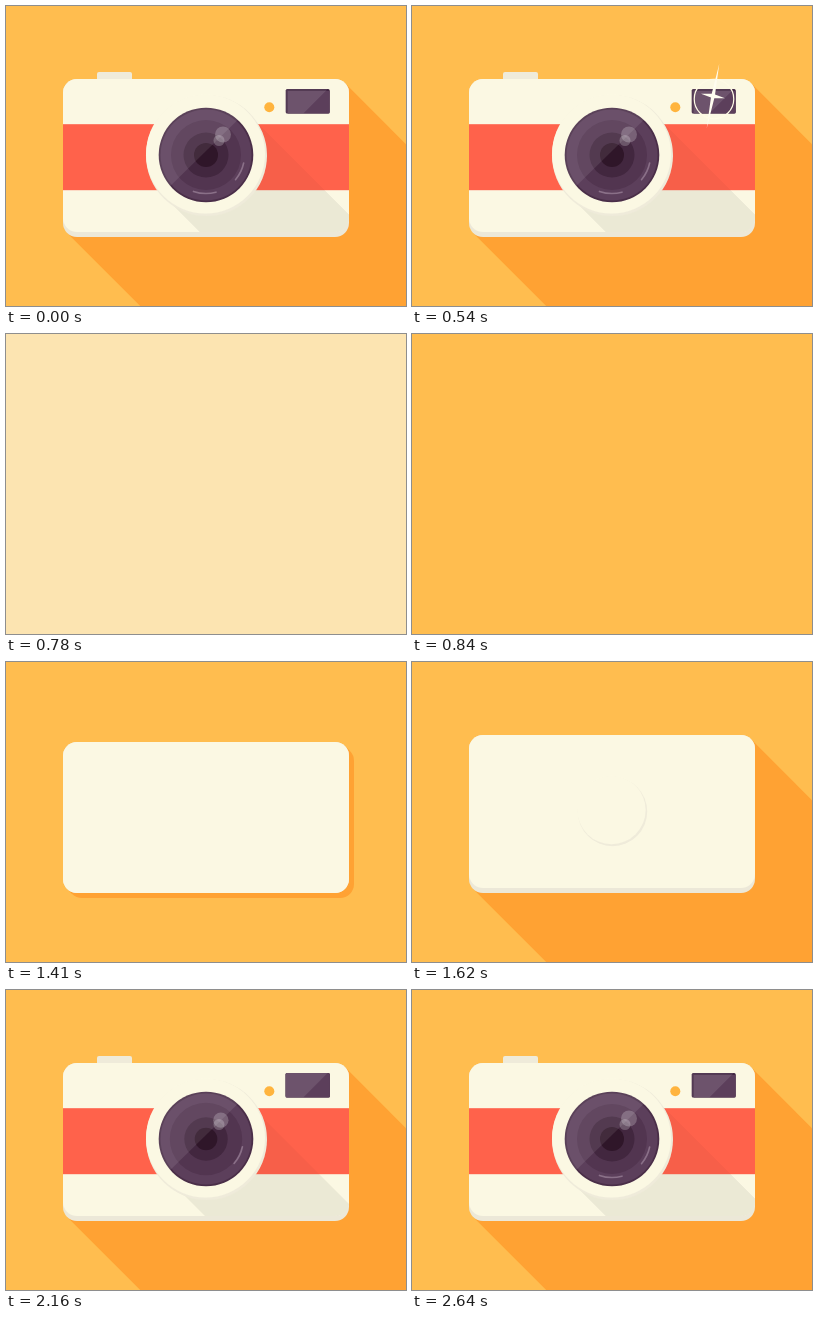
Recreate the animation shown at these times as an HTML page. Size 400x300 px, loop 2.7 s.

```html
<!DOCTYPE html>
<html lang="en">
<head>
<meta charset="utf-8">
<title>Camera</title>
<style>
  html, body { margin: 0; width: 100%; height: 100%; overflow: hidden; background: #ffbd4f; }
  svg { display: block; width: 100%; height: 100%; }
</style>
</head>
<body>
<svg viewBox="0 0 400 300">
  <defs>
    <clipPath id="bodyClip"><rect id="clipRect" x="57" width="286" rx="14"/></clipPath>
    <clipPath id="lensClip"><circle id="lensClipDisc" cx="200" cy="149"/></clipPath>
    <clipPath id="windowClip"><rect id="windowClipRect"/></clipPath>
  </defs>
  <rect width="400" height="300" fill="#ffbd4f"/>
  <g id="camera">
    <g fill="#ffa233">
      <rect id="castEnd" width="286" rx="14"/>
      <polygon id="castSide"/>
    </g>
    <rect id="button" x="91" width="35" height="14" rx="2" fill="#efebda"/>
    <rect id="lip" x="57" width="286" rx="14" fill="#ece8d8"/>
    <rect id="body" x="57" width="286" rx="14" fill="#fbf8e3"/>
    <g clip-path="url(#bodyClip)">
      <g id="shade" opacity=".03">
        <path id="shadePath"/>
      </g>
      <rect id="stripe" x="57" width="286" fill="#ff624b"/>
      <use href="#shade"/>
    </g>
    <circle id="ringLip" cx="200.5" cy="149.5" fill="#efebda"/>
    <circle id="ring" cx="199.5" cy="148" fill="#fbf8e3"/>
    <circle id="rim" cx="200" cy="149" fill="#4a2e48"/>
    <circle id="lens" cx="200" cy="149" fill="#5c3f5b"/>
    <g clip-path="url(#lensClip)">
      <circle id="disc0" cx="200" cy="149" fill="#523550"/>
      <circle id="disc1" cx="200" cy="149" fill="#42273f"/>
      <circle id="disc2" cx="200" cy="149" fill="#2f1629"/>
      <polygon points="150,194 247,99 150,99" fill="#fff" opacity=".09"/>
    </g>
    <g fill="none" stroke="#8a7088" stroke-width="1.6" stroke-linecap="round">
      <path id="arcSide"/>
      <path id="arcLow"/>
    </g>
    <g fill="#fff" fill-opacity=".22">
      <circle id="glint0"/>
      <circle id="glint1"/>
    </g>
    <circle id="dot" cx="263.3" cy="101.3" fill="#ffb43e"/>
    <g clip-path="url(#windowClip)">
      <rect x="270" y="75" width="64" height="40" fill="#3f2440"/>
      <rect id="pane" width="60" height="40" fill="#5c3f5b"/>
      <polygon id="gloss" fill="#fff" opacity=".1"/>
    </g>
  </g>
  <rect id="veil" width="400" height="300" fill="#fbf8e3"/>
  <g id="flash">
    <path id="star" d="M0-67L3.5-4L25 0L3.5 4L0 67L-3.5 4L-25 0L-3.5-4Z" fill="#fffdf0"/>
    <circle id="halo" cx="302" cy="93" fill="none" stroke="#fffbe6"/>
  </g>
</svg>
<script>
const LOOP = 2700, STEP = 30;
const el = {};
document.querySelectorAll('[id]').forEach(n => el[n.id] = n);

const set = (id, attrs) => {
  for (const k in attrs) el[id].setAttribute(k, attrs[k]);
};
const show = (id, on) => set(id, { visibility: on ? 'visible' : 'hidden' });
const ramp = (t, a, b) => Math.min(1, Math.max(0, (t - a) / (b - a)));
const mix = (a, b, p) => a + (b - a) * p;
const out = (t, a, b) => 1 - (1 - ramp(t, a, b)) ** 3;
const inOut = (t, a, b) => {
  const u = ramp(t, a, b);
  return u * u * (3 - 2 * u);
};
const back = (t, a, b, s = 1) => {
  const u = ramp(t, a, b) - 1;
  return Math.max(0, 1 + (s + 1) * u ** 3 + s * u * u);
};
const radius = (id, r) => set(id, { r: Math.max(0, r) });

// Arc around the lens centre, angles in degrees
function arc(r, from, to) {
  const pt = a => {
    const q = a * Math.PI / 180;
    return `${200 + r * Math.cos(q)} ${149 + r * Math.sin(q)}`;
  };
  return `M${pt(from)}A${r} ${r} 0 0 1 ${pt(to)}`;
}

function drawBody(t) {
  const top = mix(80, 73, out(t, 1410, 1650));
  const height = 231 - top;
  const lip = 5 * out(t, 1440, 1680);
  const d = mix(5, 300, inOut(t, 1410, 1800));
  const c = 14 * (1 - Math.SQRT1_2);
  set('castEnd', { x: 57 + d, y: top + d, height });
  set('castSide', {
    points: [343 - c, top + c, 343 - c + d, top + c + d,
             57 + c + d, 231 - c + d, 57 + c, 231 - c].join(' ')
  });
  set('lip', { y: top, height });
  set('body', { y: top, height: height - lip });
  set('clipRect', { y: top, height: height - lip });

  const rise = 9 * out(t, 1680, 1860) - 2 * inOut(t, 1890, 2070);
  set('button', { y: 73 - rise });
  show('button', rise > 0);

  const band = 66 * back(t, 1770, 2160);
  set('stripe', { y: 151.2 - band / 2, height: band });
}

function drawLens(t) {
  const ring = back(t, 1560, 1890);
  radius('ringLip', 60.5 * ring);
  radius('ring', 59.5 * ring);

  const lens = 47.3 * back(t, 1755, 2160);
  radius('rim', lens);
  radius('lens', lens - 1.8);
  radius('lensClipDisc', lens);
  radius('disc0', 35 * back(t, 1920, 2310));
  radius('disc1', mix(17.5, 22.5, inOut(t, 1890, 2250)) * back(t, 1740, 1890));
  radius('disc2', mix(9, 12, inOut(t, 1890, 2280)) * back(t, 1770, 1890));

  const grow = inOut(t, 1890, 2280);
  const r = mix(42, 59, grow) * ring;
  const len = 58 * inOut(t, 1620, 1890) + 150 * grow;
  const k = r * Math.SQRT1_2, x = 200 + len, y = 149 + len;
  set('shadePath', {
    d: `M${200 - k} ${149 + k}L${x - k} ${y + k}` +
       `A${r} ${r} 0 0 0 ${x + k} ${y - k}L${200 + k} ${149 - k}Z`
  });

  const side = ramp(t, 1800, 1890), low = ramp(t, 2250, 2640);
  const ar = mix(33, 38.5, grow);
  set('arcSide', { d: arc(ar, mix(45, 12, side), mix(45, 40, grow)) });
  set('arcLow', { d: arc(ar, 75, mix(75, 109, low)) });
  show('arcSide', side > 0);
  show('arcLow', low > 0);
  set('glint0', { cx: mix(207.5, 217, grow), cy: mix(136, 128.5, grow) });
  radius('glint0', mix(6.5, 8, grow) * ramp(t, 1770, 1890));
  set('glint1', { cx: 213, cy: 134.5 });
  radius('glint1', 5.5 * back(t, 2010, 2310));
}

function drawFinder(t) {
  const pop = back(t, 1710, 1890);
  const wide = back(t, 1900, 2250);
  const w = mix(27.5, 44, wide) * pop, h = 24.5 * pop;
  const x = 301.7 - w / 2, y = mix(96, 95.2, wide) - h / 2;
  const inset = 2 * inOut(t, 2100, 2550);
  set('windowClipRect', { x, y, width: w, height: h, rx: 1.5 });
  set('pane', { x: x + inset, y: y + inset });
  const mid = x + w * .4;
  set('gloss', { points: [x, y, x + w, y, mid + h, y, mid, y + h, x, y + h].join(' ') });
  radius('dot', 5 * back(t, 1875, 2160, 1.4));
}

function drawFlash(t) {
  const on = t >= 540 && t < 750;
  show('flash', on);
  const p = out(t, 510, 660);
  set('star', { transform: `translate(301 90) rotate(11) scale(${p})` });
  set('halo', { r: 40.5 * p, 'stroke-width': 1.2 });
  const veil = t < 750 ? ramp(t, 600, 720) ** 1.15 : 1 - ramp(t, 750, 840);
  set('veil', { opacity: veil });
}

function render(time) {
  const t = Math.floor((time % LOOP) / STEP) * STEP;
  const pose = t < 750 ? LOOP : t;
  show('camera', t < 750 || t >= 1410);
  for (const id of ['arcSide', 'arcLow', 'button']) el[id].removeAttribute('visibility');
  if (t < 750 || t >= 1410) {
    drawBody(pose);
    drawLens(pose);
    drawFinder(pose);
  }
  drawFlash(t);
}

const start = performance.now();
function tick() {
  render(performance.now() - start);
  requestAnimationFrame(tick);
}
tick();
</script>
</body>
</html>
```
